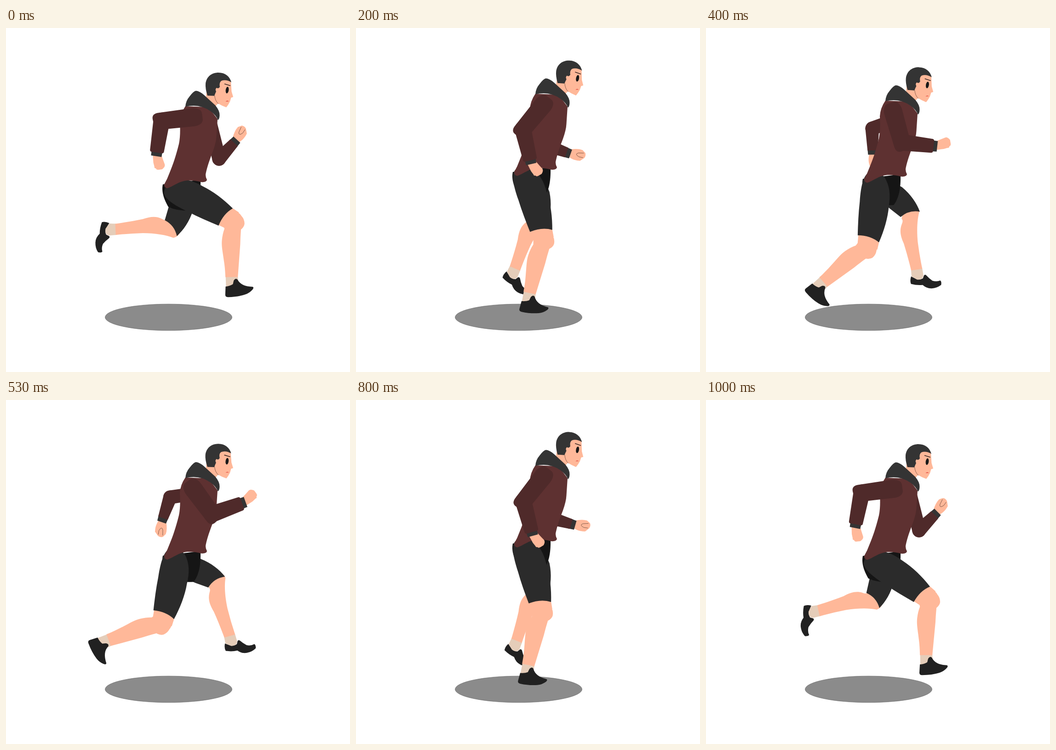
An HTML page for the animation above (1070 ms loop, 748 by 748 pixels).

```html
<!DOCTYPE html>
<html lang="en">
<head>
<meta charset="utf-8">
<title>Runner</title>
<style>
  html, body { margin: 0; width: 100%; height: 100%; overflow: hidden; background: #fff; }
  svg { display: block; width: 100%; height: 100%; }
  .skin { fill: #ffb899; }
  .sleeve { fill: #4f2a2a; }
  .shorts { fill: #2b2b2b; }
  .shoe { fill: #212121; }
  .sock { fill: #e5cdb9; }
  .knit { fill: #343434; }
  .line { fill: none; stroke: #6b4a3c; stroke-width: .8; }
</style>
</head>
<body>
<svg viewBox="0 0 748 748">
  <ellipse cx="353.5" cy="629" rx="138" ry="28.8" fill="#8b8b8b" stroke="#555" stroke-width=".6"/>
  <g id="body">
    <!-- far arm -->
    <g id="farArm">
      <path class="sleeve" d="M-14,0 A14,14 0 0 1 14,0 L15,87 A15,15 0 0 1 -15,87 Z"/>
      <g id="farFore">
        <g id="farHand">
          <path class="skin" d="M-8,6 C-13,16 -13,24 -12,32 L-4,40 Q2,43 7,40 L12,33 Q14,22 8,6 Z"/>
          <path class="line" d="M-4,37 L-4,28 Q0,17 4,25 L6,37"/>
        </g>
        <path class="knit" d="M-11,44 L11,44 L10,57 L-10,57 Z"/>
        <path class="sleeve" d="M-15,0 A15,15 0 0 1 15,0 L11,48 L-11,48 Z"/>
      </g>
    </g>

    <!-- far leg -->
    <g id="farThigh">
      <g id="farCalf">
        <path class="shoe" d="M-14,13 Q-18,22 -16,29 Q-3,34 9,34 Q17,43 28,43.5 Q40,44 49,38 Q51,31 48,28.5 Q40,31 31,27 Q24,21 19,14 Q16,11 14,14 L11,20 Q4,23 -3,20 Z" transform="translate(0 120)"/>
        <path class="sock" d="M-12.5,118 L12,118 L13,134 Q10,144 -2,141 L-13,133 Z"/>
        <path class="skin" d="M-19,0 A19,19 0 0 1 19.3,-6 C13,10 9,32 8.5,60 Q9,90 12,119 L-12.4,120 C-15,100 -18,80 -22,60 C-28,42 -28,30 -22,18 Q-17,10 -21,6 Z"/>
      </g>
      <path class="shorts" d="M-22,-8 L-22,36 L-18.7,67 Q5,69 18.7,89 C27,72 32,50 30,24 L20,-12 Z"/>
    </g>

    <path fill="#151515" d="M341,340 C337,358 346,377 353,389 Q374,399 408,397 C418,384 424,364 423,330 Z"/>

    <!-- near leg -->
    <g id="nearThigh">
      <g id="nearCalf">
        <g transform="translate(0 122) rotate(-2)">
          <path class="sock" d="M-13.5,-2 L13,-2 L14,14 L0,22 L-13,21 Z"/>
          <path class="shoe" d="M-14,20 Q-4,19 2,15 L4,7 Q8,1 12,5 Q16,13 24,17 Q32,21 45,21.5 Q48,23 45,27 Q38,35 28,38 Q12,43 -9,43 Q-15,43 -15,38 Z"/>
        </g>
        <path class="skin" d="M-22,0 A22,22 0 0 1 19,-11 Q25,-5 25.5,5 Q25,12 18,18 Q17,35 17,50 L13,121 L-14,122 C-15,105 -16,98 -18,86 C-21,66 -24,55 -23,42 Q-22,28 -18,17 Z"/>
        <circle class="skin" r="21"/>
      </g>
      <path class="skin" d="M-23,112 L23,116 L24,128 L23,142 L-21,142 Z"/>
      <path class="shorts" d="M-22,-20 C-32,-12 -34,10 -31,45 C-30,70 -27,95 -24,118 Q4,114 24,126 C31,100 35,70 33,45 C33,20 28,0 13,-17 Q-5,-28 -22,-20 Z"/>
    </g>

    <!-- head -->
    <g id="head">
      <path class="skin" d="M436,140 L454,132 L467,110 L489,115 L490.5,138 L494,150 L489.5,151.5 L487,160 Q483,168 479,172.5 Q469,169 461,164 L454,172 L434,156 Z"/>
      <path class="line" d="M453.5,147 Q455,159 462,165"/>
      <path class="knit" d="M438,147 Q433,131 434,121 C436,105 448,97 462,97 C477,97 487,106 490,118 Q478,111 468,115 Q463,119 465,128 Q462,133 458,130 Q454,133 457,138 Q455,142 453,147.5 Z"/>
      <path d="M475,121.5 L488,125.5" stroke="#3b2a26" stroke-width="1.6"/>
      <ellipse cx="481" cy="135" rx="3.3" ry="7.2" fill="#181818" transform="rotate(8 481 135)"/>
      <path d="M477.5,160 Q481,156.5 484.5,159.5 Z" fill="#e2483f"/>
    </g>

    <!-- hoodie -->
    <path fill="#5e3131" d="M390,170 Q379,186 378,204 C379,220 379,238 376,252 C370,276 364,295 356,314 Q351,328 344,340 Q344,348 351,348.5 C364,344 376,333 394,331.5 Q412,331 424,335 Q436,336 437,330 Q433,323 434.5,316 C438,300 443,286 450,268 Q457,248 457.5,236 L460,198 L440,172 Z"/>
    <path class="knit" d="M390,171 Q391,158 399,149 Q408,137 413,136.5 Q421,137 431,146 L455,168 Q465,180 464.5,190 Q464,198 461,200 Q456,189 445,181 Q428,169 408,169 Q399,169 390,171 Z"/>

    <!-- near arm -->
    <g id="nearArm">
      <path class="sleeve" d="M-20,-2 Q-17,-20 -6,-20 L8,-20 Q19,-18 20,0 L18,69 C18,80 5,88 -8,88 Q-18,88 -19,76 Z"/>
      <g id="nearFore">
        <path class="skin" transform="translate(0 72) rotate(-20)" d="M-9,2 L-11,18 L-10.5,27 Q-12,30 -8,31.5 Q-8,35 -3,35.5 L5,36 Q13,32 12.5,27 L11,17 L9,2 Z"/>
        <path class="knit" d="M-12,66 L12,66 L11.5,78 L-11.5,78 Z"/>
        <path class="sleeve" d="M-18,0 A18,18 0 0 1 18,0 L15,67 Q14,70 11,70 L-12,70 Q-15,70 -15.5,66 Z"/>
      </g>
    </g>
  </g>
</svg>
<script>
  const LOOP = 1070, STEPS = 16;

  // Steps at which the angles below are given; the last one closes the loop.
  const KEYS = [0, 2, 5, 8, 10, 13, 15, 16];

  // Joint position inside its parent, then clockwise angles in degrees.
  const JOINTS = {
    head:      { at: [445, 155], deg: [0, 2.2, 2, -0.7, 2, 2, 0], inPlace: true },
    nearArm:   { at: [407, 194], deg: [82.8, 57.2, 0, -36.9, 0, 54.8, 82] },
    nearFore:  { at: [-1, 69], deg: [8.6, 2, -63.4, -110, -63.4, 0, 10.8], parent: "nearArm" },
    farArm:    { at: [443, 200], deg: [-13.5, 3, 59, 81.4, 51, 0, -13.5] },
    farFore:   { at: [0, 87], deg: [-137.2, -97, -18, 19, -22, -98, -135], parent: "farArm" },
    nearThigh: { at: [372, 350], deg: [-60, -27.4, 4.4, 13.8, 4.4, -24.4, -53] },
    nearCalf:  { at: [0, 140], deg: [1, 6.4, 37.3, 71.7, 37.3, 7.1, 2.2], parent: "nearThigh" },
    farThigh:  { at: [388, 363], deg: [22.3, 5, -32.9, -63.8, -32.9, 3.5, 18.8] },
    farCalf:   { at: [0, 80], deg: [89.5, 43.2, 0.2, -13, 0.2, 39.1, 80], parent: "farThigh" }
  };

  // Height of the body at each step.
  const BOB = [0, -7, -17, -27, -30, -19, -12, -6, -1.5, -9, -19, -30, -28, -18.5, -8, -1];

  const $ = id => document.getElementById(id);

  // Monotone cubic through the keyed angles, wrapping round the loop.
  function angle(deg, step) {
    const n = deg.length;
    const slope = k => {
      const i = (k + n) % n;
      return (deg[(i + 1) % n] - deg[i]) / (KEYS[i + 1] - KEYS[i]);
    };
    const tangent = k => {
      const a = slope(k - 1), b = slope(k);
      return a * b <= 0 ? 0 : 2 * a * b / (a + b);
    };
    let k = 0;
    while (step >= KEYS[k + 1]) k++;
    const h = KEYS[k + 1] - KEYS[k], u = (step - KEYS[k]) / h, v = 1 - u;
    return deg[k] * (1 + 2 * u) * v * v + deg[(k + 1) % n] * u * u * (3 - 2 * u)
      + h * u * v * (tangent(k) * v - tangent(k + 1) * u);
  }

  function pose(step) {
    const turn = {};
    for (const [id, joint] of Object.entries(JOINTS)) {
      const [x, y] = joint.at;
      turn[id] = angle(joint.deg, step);
      const own = turn[id] - (joint.parent ? turn[joint.parent] : 0);
      $(id).setAttribute("transform", joint.inPlace
        ? `rotate(${own} ${x} ${y})`
        : `translate(${x} ${y}) rotate(${own})`);
    }
    $("body").setAttribute("transform", `translate(0 ${BOB[step]})`);
  }

  const startOf = step => Math.round(step * 20 / 3) * 10;
  const began = performance.now();
  let shown = -1;

  function draw() {
    const t = (performance.now() - began) % LOOP;
    let step = STEPS - 1;
    while (startOf(step) > t) step--;
    if (step !== shown) pose(shown = step);
    requestAnimationFrame(draw);
  }

  $("farHand").setAttribute("transform", "translate(0 48) rotate(-9)");
  draw();
</script>
</body>
</html>
```
